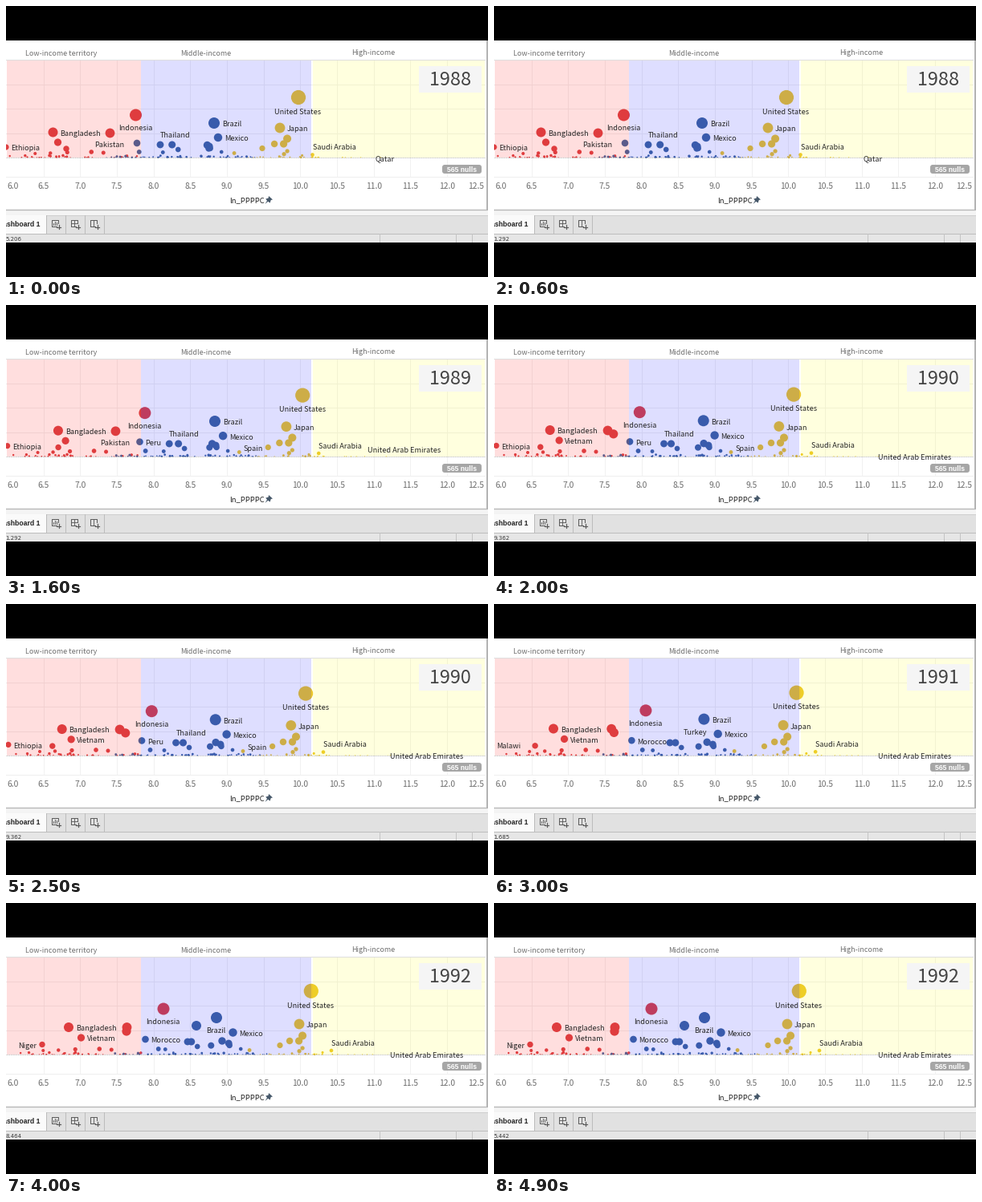
Animation, 600 px wide and 338 px high, one loop 5 s. Source, as a matplotlib script:

```python
import numpy as np
import matplotlib.pyplot as plt
from matplotlib.animation import FuncAnimation
from matplotlib.patches import Rectangle, FancyBboxPatch, Polygon

W, H, DPI = 600, 338, 100
PT = 72 / DPI
SANS, BOLD = "Noto Sans CJK JP", "Liberation Sans"
RED, BLUE, GOLD = "#db4648", "#4269a0", "#ecc72c"
FLOOR = 189.3
LABEL_SIZE = 9.15

FIRST_YEAR, LAST = 1988, 4
STATUS_FRAMES = [6, 17, 27, 37, 49]
STATUS = ["5.206", "1.292", "9.362", "1.685", "8.464", "5.442"]
MOVE_FRAMES = 3

fig = plt.figure(figsize=(W / DPI, H / DPI), dpi=DPI, facecolor="black")
ax = fig.add_axes([0, 0, 1, 1])
ax.set(xlim=(0, W), ylim=(H, 0))
ax.axis("off")

bubbles = []  # color, radius, start, end, years
labels = []   # text artist, bubble, side, years


def growth(pos):
    """Share of the whole drift covered after pos years."""
    return (pos / LAST) ** 0.8


def alive(years, pos):
    return years[0] - 0.5 < pos < years[1] + 0.5


def box(x0, y0, x1, y1, color, z=0, **kw):
    ax.add_patch(Rectangle((x0, y0), x1 - x0, y1 - y0, fc=color, lw=0, zorder=z, **kw))


def line(xs, ys, color, width=1, z=1, **kw):
    ax.plot(xs, ys, color=color, lw=width * PT, zorder=z, **kw)


def baseline(y, size):
    return y + 0.366 * size


def text(x, y, s, size, color, ha="left", font=SANS, z=6, **kw):
    """Place text with its capitals centred on y; size is in pixels."""
    return ax.text(x, baseline(y, size), s, fontsize=size * PT, color=color,
                   ha=ha, va="baseline", family=font, zorder=z, **kw)


def bubble(color, r, start, end, years=(0, LAST)):
    bubbles.append((color, r, start, end, years))
    return len(bubbles) - 1


def label(s, index, side="right", years=(0, LAST)):
    ha = {"below": "center", "left": "right", "above left": "right"}.get(side, "left")
    labels.append((text(0, 0, s, LABEL_SIZE, "#262626", ha), index, side, years))


def cluster(color, drift, middles):
    """Unnamed bubbles sharing one drift, given by place in the middle year."""
    g = growth(LAST / 2)
    for x, y, r in middles:
        bubble(color, r, (x - drift * g, y), (x + drift * (1 - g), y))


def add_countries():
    label("Ethiopia", bubble(RED, 3.6, (0, 176), (5, 175), (0, 2)), years=(0, 2))
    label("Niger", bubble(RED, 3.7, (75, 178), (45, 176.5)), "left", (4, 4))
    label("Bangladesh", bubble(RED, 6, (58.5, 157.5), (78, 155)))
    label("Pakistan", bubble(RED, 5.9, (129.5, 158.5), (150.5, 155)), "below", (0, 1))
    bubble(RED, 5.6, (147, 162), (150, 160), (2, LAST))
    label("Vietnam", bubble(RED, 4.6, (64.5, 170), (93.5, 168)), years=(2, 4))
    label("Indonesia", bubble(RED, 7.5, (161.5, 136), (196, 132)), "below")
    cluster(RED, 10, [(82, 182.5, 2.6), (112, 182, 2.8), (127, 183, 2.5),
                      (61, 183.5, 2.2), (42, 184, 2)])

    label("Thailand", bubble(BLUE, 4.4, (192, 173), (226, 173)), "above", (0, 2))
    andes = bubble(BLUE, 4.3, (163, 171), (173.5, 170))
    label("Peru", andes, years=(1, 2))
    label("Morocco", andes, years=(3, 4))
    label("Turkey", bubble(BLUE, 4.7, (250.5, 173.5), (269, 172)), "above left", (3, 3))
    brazil = bubble(BLUE, 7, (259, 146), (262, 143))
    label("Brazil", brazil, years=(0, 3))
    label("Brazil", brazil, "below", (4, 4))
    label("Mexico", bubble(BLUE, 5.2, (264, 164), (282.5, 161.5)))
    bubble(BLUE, 6, (237, 153), (237, 153), (4, 4))
    cluster(BLUE, 24, [(220.5, 173, 4.5), (267, 175, 4.4), (268, 177.5, 3.7),
                       (228, 179, 3.3), (179.5, 182, 2.9), (282, 182, 2.3)])
    cluster(BLUE, 3, [(254, 177.7, 4), (197, 182.5, 2.4)])

    label("United States", bubble(GOLD, 9.1, (364, 114), (379.8, 109.8)), "below")
    label("Japan", bubble(GOLD, 6.4, (341, 152), (365, 151)))
    label("Spain", bubble(GOLD, 3.6, (319, 177.5), (341, 177.5)), "left", (1, 2))
    label("Saudi Arabia", bubble(GOLD, 2.3, (381.5, 185.5), (405, 184)), "above")
    cluster(GOLD, 19, [(361, 165.5, 5), (356.5, 172, 4.6), (345, 172, 4.2),
                       (361, 181, 2.6), (357, 184.7, 2.6), (295, 183.5, 2.4)])

    # Labels of specks too small to show: centre-left point on or near the floor.
    for s, x, y, years in (("Malawi", 0, 176, (3, 3)), ("Qatar", 456, 189, (0, 0)),
                           ("United Arab Emirates", 447, 180, (1, 1)),
                           ("United Arab Emirates", 475.5, 188.5, (2, 4))):
        label(s, bubble(GOLD, 0.3, (x, y), (x, y), years), years=years)


def add_specks():
    """Small countries crowded along the floor, drifting right each year."""
    rng = np.random.default_rng(8)
    for color, count, left, right, spread in ((RED, 34, 2, 165, 1.3), (BLUE, 62, 120, 310, 1.3),
                                              (GOLD, 22, 300, 390, 1.2), (GOLD, 6, 390, 475, 0)):
        for x in rng.uniform(left, right, count):
            r = 0.55 + spread * rng.random() ** 2
            y = FLOOR - 0.4 - 2.6 * rng.random() * (r - 0.5)
            bubble(color, r, (x, y), (x + rng.normal(12, 8), y))


def draw_chart():
    box(0, 43, W, 254, "white")
    for x in 1 + 45.68 * np.arange(1, 13):
        line([x, x], [67, 212], "#f1f1f1")
    for y in (97.5, 127.5, 158.5, 212.5):
        line([0, 596], [y, y], "#efefef")
    line([0, 596], [66.5, 66.5], "#dedede")
    for x0, x1, color in ((1, 168, "#ff0000"), (168, 380, "#0000ff"), (381.5, 596, "#ffff00")):
        box(x0, 67.5, x1, 189, color, 3, alpha=0.13)
    line([0, 596], [FLOOR, FLOOR], "#909090", 0.7, 4, dashes=(1.2, 1.4))
    box(597.5, 43, W, 255, "#b4b4b4", 1)
    line([0, 598], [254.3, 254.3], "#b8b8b8", 1.4)
    for x, s, y in ((69, "Low-income territory", 58.5), (248.5, "Middle-income", 58.8),
                    (457.5, "High-income", 57.8)):
        text(x, y, s, 9, "#707070", "center")
    for i in range(14):
        x = np.clip(1 + 45.68 * i, 8.5, 585)
        text(x, 224.3, f"{6 + i / 2:.1f}", 10.2, "#6c6c6c", "center")
    text(278, 242, "ln_PPPPC", 9.4, "#222222")
    pin = [(327, 237), (332, 241.5), (329.8, 242), (328.6, 245.6), (326.2, 243.8),
           (322.5, 247), (325, 242.8), (323.2, 240.6), (326.6, 239.6)]
    ax.add_patch(Polygon(pin, fc="#46586a", lw=0, zorder=5))
    ax.add_patch(FancyBboxPatch((545, 200), 45, 7, fc="#a6a6a6", lw=0, zorder=5,
                                boxstyle="round,pad=2,rounding_size=3"))
    text(567.5, 203.5, "565 nulls", 8.6, "white", "center", BOLD, weight="bold")
    box(514, 75, 592, 107.5, "#f5f5f5", 5)


def draw_tabs():
    box(0, 255, W, 261, "#f4f4f4")
    box(0, 261, W, 283.5, "#e1e1e1")
    line([0, W], [261, 261], "#cfcfcf")
    box(0, 261, 50, 283.5, "#fafafa", 1)
    text(43, 271.5, "Dashboard 1", 8.7, "#222222", "right", BOLD, weight="bold")
    for x in (50, 74, 98, 122):
        line([x, x], [261, 283], "#bcbcbc", z=2)
    ink = "#5c5c5c"
    for i, x in enumerate((61, 85, 109)):
        line([x + 2, x - 4, x - 4, x + 4, x + 4], [275, 275, 267, 267, 271], ink, z=3)
        line([x + 2, x + 7], [275.5, 275.5], ink, 1.2, 3)
        line([x + 4.5, x + 4.5], [273, 278], ink, 1.2, 3)
        if i == 0:
            for dx, top in ((-1.7, 271), (0, 269), (1.8, 270)):
                line([x + dx, x + dx], [273, top], ink, 0.9, 3)
        else:
            line([x, x], [267, 275], ink, 0.9, 3)
            if i == 1:
                line([x - 4, x + 4], [271, 271], ink, 0.9, 3)
    box(0, 283.5, W, 295, "#e6e6e6")
    line([0, W], [283.5, 283.5], "#bdbdbd", z=2)
    for x in (465, 560, 580):
        line([x, x], [284, 295], "#c4c4c4", z=2)
    box(0, 295, W, H, "black", 8)


def label_place(side, x, y, r):
    gap = r + 2.7
    return {"right": (x + gap, y + 1),
            "left": (x - gap, y + 1),
            "below": (x - 0.5, y + r + 8.3),
            "above": (x, y - r - 7.5),
            "above left": (x, y - r - 7.5)}[side]


draw_chart()
draw_tabs()
add_countries()
add_specks()
colors, radii, starts, ends, spans = zip(*bubbles)
starts, ends = np.array(starts), np.array(ends)
marks = ax.scatter(*starts.T, s=(2 * np.array(radii) * PT) ** 2, c=colors, lw=0, zorder=2)
year = text(553, 90.9, "", 23.4, "#444444", "center")
status = text(-0.5, 290.3, "", 7, "#3c3c3c", font="DejaVu Sans")


def update(frame):
    steps = [np.clip((frame - start) / MOVE_FRAMES, 0, 1) for start in STATUS_FRAMES]
    pos = sum(p * p * (3 - 2 * p) for p in steps)

    places = starts + (ends - starts) * growth(pos)
    shown = np.array([alive(span, pos) for span in spans])
    marks.set_offsets(np.where(shown[:, None], places, -50))

    for artist, index, side, years in labels:
        artist.set_visible(alive(years, pos))
        x, y = label_place(side, *places[index], radii[index])
        artist.set_position((x, baseline(y, LABEL_SIZE)))

    year.set_text(str(FIRST_YEAR + sum(frame > start for start in STATUS_FRAMES)))
    status.set_text(STATUS[sum(frame >= start for start in STATUS_FRAMES)])
    return [marks, year, status]


anim = FuncAnimation(fig, update, frames=50, interval=100, repeat=True,
                     repeat_delay=0, blit=False)
plt.show()
```
